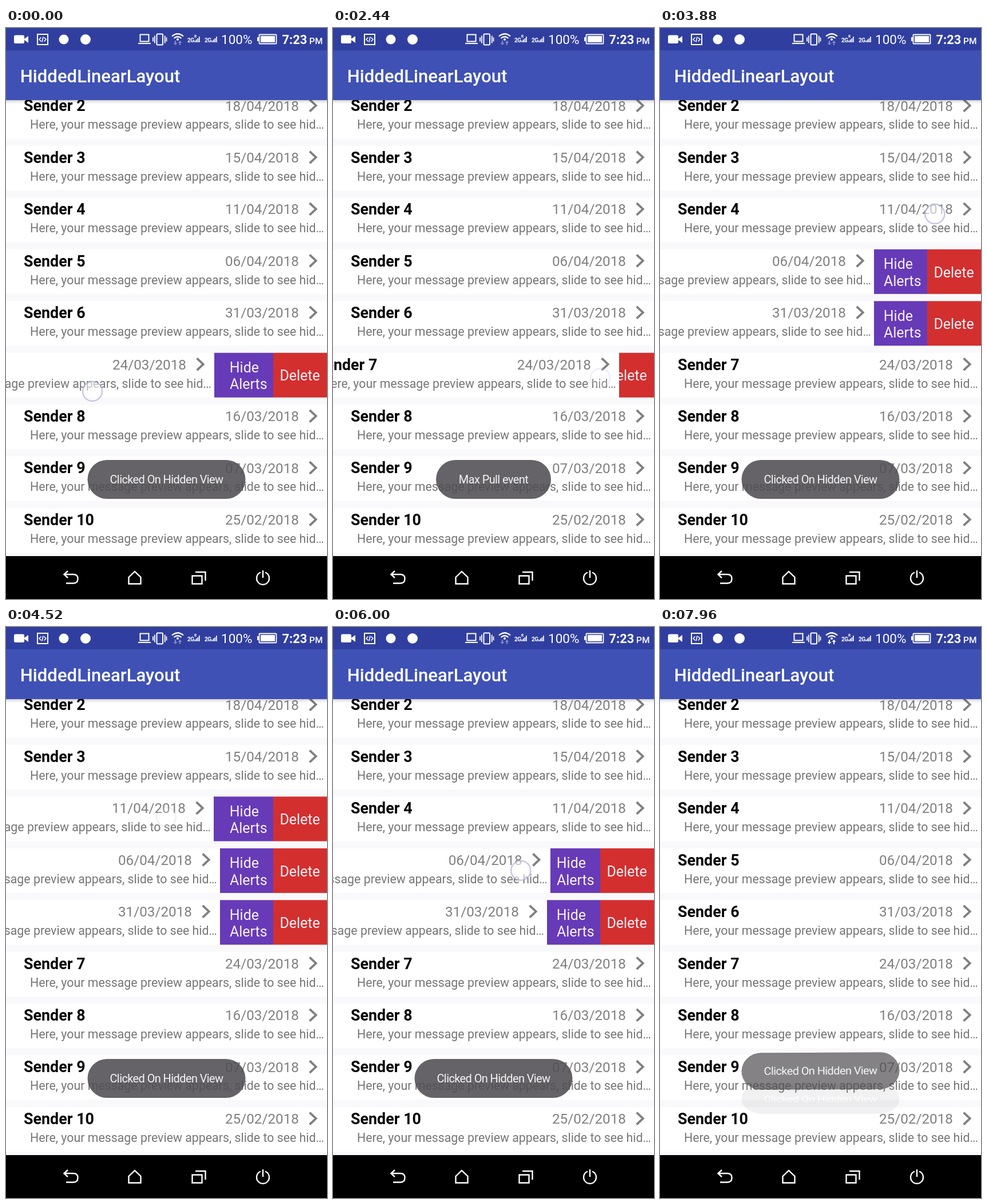
An HTML page that plays this animation: 561 px wide and 998 px high, repeating every 8 s.

```html
<!DOCTYPE html>
<html lang="en">
<head>
<meta charset="utf-8">
<title>HiddedLinearLayout</title>
<style>
  html, body { margin: 0; width: 100%; height: 100%; overflow: hidden; background: #000; }
  svg { display: block; width: 100%; height: 100%; }
  text { font-family: Roboto, Inter, sans-serif; white-space: pre; }
  .sender { font-size: 26.83px; font-weight: 700; fill: #050505; }
  .date { font-size: 24.25px; fill: #808080; }
  .preview { font-size: 21.34px; fill: #767676; }
  .button { font-size: 24.93px; fill: #f6f2f8; }
  .toast { font-size: 20px; letter-spacing: -.6px; fill: #f4f4f4; text-anchor: middle; }
  .network { font-size: 10px; font-weight: 700; letter-spacing: -.6px; }
  .line { fill: none; stroke: #fff; }
</style>
</head>
<body>
<svg viewBox="0 0 561 998" preserveAspectRatio="none">
  <defs>
    <linearGradient id="shade" x2="0" y2="1">
      <stop stop-color="#000" stop-opacity=".2"/>
      <stop offset=".4" stop-color="#000" stop-opacity=".08"/>
      <stop offset="1" stop-color="#000" stop-opacity="0"/>
    </linearGradient>
  </defs>
  <rect width="561" height="998" fill="#f9f8fa"/>
  <g id="rows"></g>

  <rect y="126" width="561" height="7" fill="url(#shade)"/>
  <rect y="39" width="561" height="87" fill="#3f51b5"/>
  <text x="24.7" y="94.5" font-size="31.1" font-weight="500" fill="#fff">HiddedLinearLayout</text>

  <rect width="561" height="39" fill="#303f9f"/>
  <g fill="#fff">
    <rect x="14" y="12.5" width="18" height="14.5" rx="2.5"/>
    <path d="M32 19 L39 14 V26 L32 21Z"/>
    <path class="line" stroke-width="2" d="M55 11 H73 V29 H55Z"/>
    <path class="line" stroke-width="1.5" d="M61.5 16.5 L58 20 L61.5 23.5 M66.5 16.5 L70 20 L66.5 23.5 M65 15.5 L63 24.5"/>
    <circle cx="101" cy="20" r="8.5"/>
    <circle cx="139" cy="20" r="9"/>
    <path class="line" stroke-width="2" d="M234.5 11.5 H249.5 V23.5 H234.5Z M231 27 H253"/>
    <rect class="line" stroke-width="2" x="263.5" y="10.5" width="10.5" height="19" rx="1.5"/>
    <path class="line" stroke-width="1.8" d="M259.8 13.5 V26.5 M277.7 13.5 V26.5 M257 16.5 V23.5 M280.5 16.5 V23.5"/>
    <path class="line" stroke-width="2.2" d="M290 14.5 Q300 6 310 14.5 M293.5 18 Q300 12.5 306.5 18"/>
    <circle cx="300" cy="20" r="2"/>
    <path id="traffic" d="M297 22 V26 H299.5 L296 30 L292.5 26 H295 V22Z M303 30 V26 H300.5 L304 22 L307.5 26 H305 V30Z"/>
    <g id="signals"></g>
    <text x="376" y="28" font-size="22.5">100%</text>
    <rect class="line" stroke-width="1.8" x="442.5" y="11.5" width="30" height="16" rx="1"/>
    <rect x="445" y="14" width="25" height="11"/>
    <rect x="439" y="16" width="3" height="7"/>
    <text x="482.5" y="28" font-size="21.8" font-weight="700">7:23</text>
    <text x="530" y="28" font-size="15.5" font-weight="500">PM</text>
  </g>

  <g id="toasts"></g>
  <circle id="touch" r="17" fill="#fff" fill-opacity=".55" stroke="#a9a9d6" stroke-opacity=".65" stroke-width="2.4"/>

  <rect y="923" width="561" height="75" fill="#000"/>
  <g class="line" stroke-width="2.4">
    <path d="M108 949 L101.5 955 L108 961 M102 955 H118 Q125.5 955 125.5 962.5 Q125.5 970.5 118 970.5 H105"/>
    <path d="M214.5 960 L225 950 L235.5 960 V971.5 H214.5Z"/>
    <path d="M325.5 957.5 H342.5 V971.5 H325.5Z M331 951 H348.5 V966"/>
    <path d="M445 951.5 A11 11 0 1 0 453 951.5 M449 948 V961"/>
  </g>
</svg>
<script>
const LOOP = 8000;
const WIDTH = 561;
const DELETE_X = 467;
const dates = ['18/04', '15/04', '11/04', '06/04', '31/03', '24/03', '16/03', '07/03', '25/02'];

// Row number -> [time, horizontal offset] keys
const slides = {
  4: [[3900, 0], [4400, -198], [4560, -198], [4760, -187], [5490, -187], [5890, 0]],
  5: [[3280, 0], [3640, -195], [3760, -187], [5960, -187], [6350, 0]],
  6: [[2680, 0], [2940, -195], [3060, -187], [6400, -187], [6720, 0]],
  7: [[0, -197], [320, -205], [480, -205], [680, -187], [2200, -187], [2590, 0]]
};

// [start, end, x from, x to, y from, y to]
const touches = [
  [0, 440, 151, 143, 635, 636],
  [2200, 2400, 352, 467, 607, 612],
  [2640, 2920, 475, 275, 520, 525],
  [3240, 3640, 478, 275, 428, 432],
  [3860, 4480, 481, 280, 325, 332],
  [5480, 5750, 310, 450, 335, 340],
  [5940, 6210, 310, 450, 425, 430],
  [6380, 6600, 310, 450, 516, 520]
];

const CLICKED = ['Clicked On Hidden View', 276];
const PULLED = ['Max Pull event', 201];
const toastTimes = [
  [CLICKED, -2000, 750],
  [PULLED, 750, 2770],
  [CLICKED, 2770, 4810],
  [CLICKED, 5650, 7700],
  [CLICKED, 7700, 9999]
];
const TOAST_SHIFT = 350;

const find = id => document.getElementById(id);
const clamp = v => Math.min(1, Math.max(0, v));
const mix = (a, b, u) => a + (b - a) * u;
const smooth = u => u * u * (3 - 2 * u);

function group(parent, markup) {
  const g = document.createElementNS('http://www.w3.org/2000/svg', 'g');
  g.innerHTML = markup;
  return parent.appendChild(g);
}

function buildRow(date, index) {
  const number = index + 2;
  const node = group(find('rows'), `
    <g class="hidden">
      <rect class="hide" height="78" fill="#673ab7"/>
      <rect class="delete" height="78" fill="#d32f2f"/>
      <text class="button" x="390.8" y="34.4">Hide</text>
      <text class="button" x="391" y="63.7">Alerts</text>
      <text class="button" x="478.4" y="48.7">Delete</text>
    </g>
    <g class="front">
      <rect width="${WIDTH}" height="78" fill="#fff"/>
      <text class="sender" x="31" y="29.8">Sender ${number}</text>
      <text class="date" x="382.9" y="29">${date}/2018</text>
      <path d="M529.3 11 L532 8.2 L544.5 20 L532 31.8 L529.3 29 L539 20Z" fill="#808080"/>
      <text class="preview" x="42" y="60.8">Here, your message preview appears, slide to see hid…</text>
    </g>`);
  node.setAttribute('transform', `translate(0 ${477.3 + (number - 6) * 90.45})`);
  const part = name => node.querySelector('.' + name);
  return { number, hidden: part('hidden'), front: part('front'), hide: part('hide'), remove: part('delete') };
}

const rows = dates.map(buildRow);
const toasts = toastTimes.map(([[label, width], start, end]) => ({
  start, end,
  node: group(find('toasts'), `
    <rect x="${-width / 2}" y="-34" width="${width}" height="68" rx="34" fill="#504e52" fill-opacity=".88"/>
    <text class="toast" y="6.5">${label}</text>`)
}));

for (const x of [317, 347]) {
  const bars = [3, 5, 7, 10].map((h, i) =>
    `<rect x="${x + 12.5 + i * 2.5}" y="${25 - h}" width="1.7" height="${h}"/>`).join('');
  group(find('signals'), `<text class="network" x="${x}" y="25">2G</text>${bars}`);
}
group(find('signals'), '<text x="329" y="17" font-size="6.5" font-weight="700">R</text>');

function valueAt(keys, t) {
  const next = keys.findIndex(key => key[0] > t);
  if (next === 0) return keys[0][1];
  if (next < 0) return keys[keys.length - 1][1];
  const [t0, a] = keys[next - 1], [t1, b] = keys[next];
  return mix(a, b, smooth((t - t0) / (t1 - t0)));
}

function setSpan(rect, from, to) {
  rect.setAttribute('x', from);
  rect.setAttribute('width', Math.max(0, to - from));
}

// The buttons are painted only right of the sliding edge, so no colour fringes the row.
function drawRow({ number, hidden, front, hide, remove }, t) {
  const offset = slides[number] ? valueAt(slides[number], t) : 0;
  const edge = WIDTH + offset;
  front.setAttribute('transform', `translate(${offset} 0)`);
  hidden.setAttribute('visibility', offset < 0 ? 'visible' : 'hidden');
  setSpan(hide, edge, DELETE_X);
  setSpan(remove, Math.max(edge, DELETE_X), WIDTH);
}

function drawToast({ node, start, end }, t) {
  const enter = clamp((t - start) / TOAST_SHIFT);
  const leave = clamp((t - end) / TOAST_SHIFT);
  const y = 789 - 51 * (1 - enter) + 48 * leave;
  const scale = (1 - .2 * (1 - enter)) * (1 - .32 * leave);
  node.setAttribute('transform',
    `translate(280.5 ${y}) skewY(${-1.2 * (1 - enter)}) scale(1 ${scale})`);
  node.setAttribute('opacity', enter ** .75 * clamp(1 - 1.3 * leave ** 1.2));
}

function drawTouch(t) {
  const active = touches.find(([start, end]) => t >= start && t < end + 60);
  const node = find('touch');
  node.setAttribute('opacity', active ? 1 - clamp((t - active[1]) / 60) : 0);
  if (!active) return;
  const [start, end, x0, x1, y0, y1] = active;
  const u = smooth(clamp((t - start) / (end - start)));
  node.setAttribute('cx', mix(x0, x1, u));
  node.setAttribute('cy', mix(y0, y1, u));
}

function render(t) {
  rows.forEach(row => drawRow(row, t));
  toasts.forEach(toast => drawToast(toast, t));
  drawTouch(t);
  const busy = (t > 400 && t < 1880) || t >= 7680;
  find('traffic').setAttribute('opacity', busy ? 1 : .4);
}

const began = performance.now();
function tick() {
  render((performance.now() - began) % LOOP);
  requestAnimationFrame(tick);
}
tick();
</script>
</body>
</html>
```
